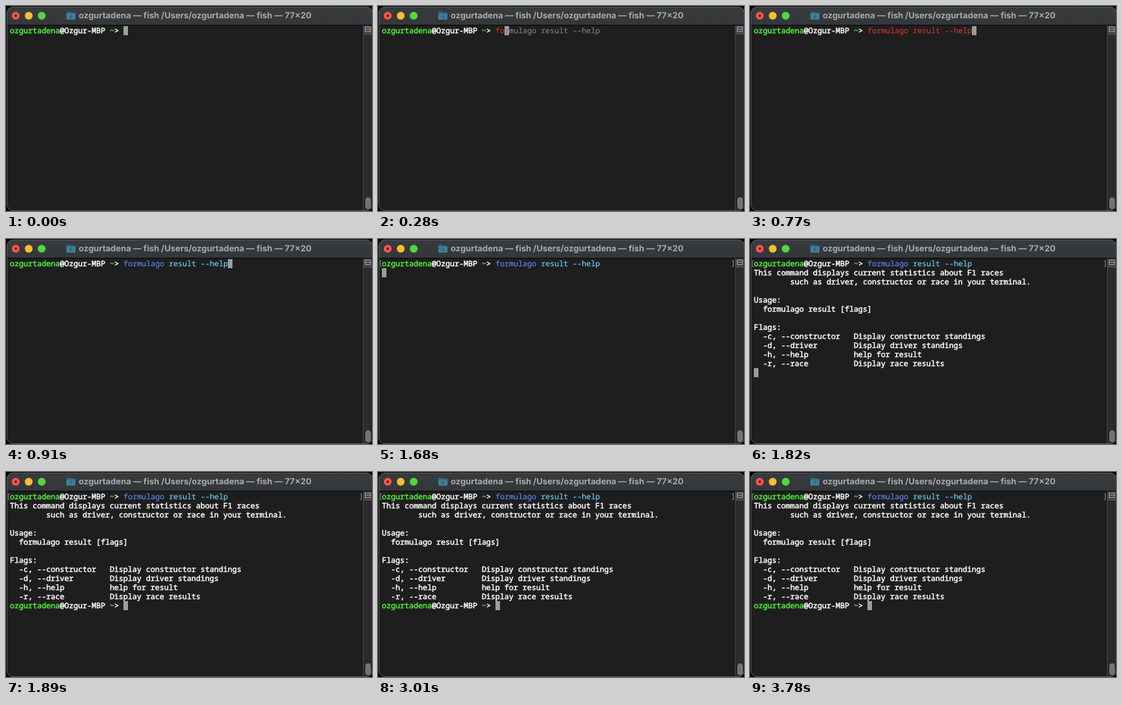
These frames come from a looping animation (564x316 px, 4200 ms). An HTML page:

```html
<!DOCTYPE html>
<html lang="en">
<head>
<meta charset="utf-8">
<title>Terminal</title>
<style>
  html, body { margin: 0; width: 100%; height: 100%; overflow: hidden; background: #000; }
  svg { display: block; width: 564px; height: 316px; }
  text { white-space: pre; text-rendering: geometricPrecision; }
  #title { font: 700 13px Inter, sans-serif; fill: #a8abad; }
  #screen { font: 500 11.667px "Noto Sans Mono", monospace; }
  #screen text { stroke-width: .2px; }
  #screen .strong { stroke-width: .5px; }
</style>
</head>
<body>
<svg viewBox="0 0 564 316">
  <defs>
    <linearGradient id="bar" x2="0" y2="1">
      <stop offset="0" stop-color="#393c3f"/>
      <stop offset="1" stop-color="#34373a"/>
    </linearGradient>
    <clipPath id="win"><rect x="1" y="1" width="564" height="315" rx="10"/></clipPath>
  </defs>
  <g clip-path="url(#win)">
    <rect width="564" height="316" fill="#1e1e1e"/>
    <rect width="564" height="29" fill="url(#bar)"/>
    <rect y="29" width="564" height="1" fill="#050505"/>
    <rect x="550" y="30" width="14" height="286" fill="#2b2b2f"/>
    <rect x="550" y="30" width="1" height="286" fill="#454548"/>
    <rect x="551" y="30" width="13" height="13" fill="#434346"/>
    <path d="M551 43.5h13" stroke="#555558"/>
    <path d="M553.5 32.5h8v7h-8zM554 36h7" fill="none" stroke="#a6a6a9"/>
    <rect x="554.5" y="295.5" width="7" height="17" rx="3.5" fill="#727275" stroke="#8a8a8d"/>
  </g>
  <rect x="1.5" y="1.5" width="563" height="314" rx="9.5" fill="none" stroke="#5d5f61"/>
  <circle cx="15" cy="15" r="6" fill="#f6564f"/>
  <circle cx="15" cy="15" r="2" fill="#760f0b"/>
  <circle cx="35" cy="15" r="6" fill="#f6be32"/>
  <circle cx="55" cy="15" r="6" fill="#4fd842"/>
  <g id="head">
    <rect y="8.5" width="7" height="6" rx="1.3" fill="#2d657f"/>
    <rect y="10" width="14" height="6" rx="1.3" fill="#2d657f"/>
    <rect y="11.5" width="14" height="9.500" rx="1.3" fill="#3f7f99"/>
    <path d="M7 13l3 3h-1v3h-4v-3h-1z" fill="#316d87"/>
    <text id="title" x="19" y="19.4"></text>
  </g>
  <g id="screen"></g>
</svg>
<script>
const NS = "http://www.w3.org/2000/svg";
const LOOP = 4200, CELL = 7, ROW = 14, LEFT = 6, TOP = 31;
const USER = "ozgurtadena", HOST = "Ozgur-MBP";
const C = {
  user: "#50f03a", cwd: "#34cc30", white: "#fff", grey: "#7d7d7d",
  red: "#cf3429", blue: "#5c86f5", cyan: "#68cdf5", cursor: "#9c9c9c"
};
const STRONG = [C.user, C.cwd, C.white];
const NAME = "formulago", ARGS = " result --help", CMD = NAME + ARGS;
const HELP = `This command displays current statistics about F1 races
        such as driver, constructor or race in your terminal.

Usage:
  formulago result [flags]

Flags:
  -c, --constructor   Display constructor standings
  -d, --driver        Display driver standings
  -h, --help          help for result
  -r, --race          Display race results`.split("\n");

const screen = document.getElementById("screen");
const head = document.getElementById("head");
const title = document.getElementById("title");

function add(tag, attrs, text = "") {
  const el = document.createElementNS(NS, tag);
  for (const k in attrs) el.setAttribute(k, attrs[k]);
  el.textContent = text;
  screen.append(el);
}

function write(col, row, text, color) {
  const pad = text.length - text.trimStart().length;
  add("text", {
    x: LEFT + (col + pad) * CELL, y: TOP + row * ROW + 11,
    fill: color, stroke: color, class: STRONG.includes(color) ? "strong" : ""
  }, text.trimStart());
}

function line(row, runs) {
  let col = 0;
  for (const [text, color] of runs) {
    write(col, row, text, color);
    col += text.length;
  }
}

const cursor = (col, row) => add("rect", {
  x: LEFT + col * CELL, y: TOP + row * ROW, width: CELL, height: ROW, fill: C.cursor
});

const PROMPT = [[USER, C.user], ["@" + HOST + " ", C.white], ["~", C.cwd], ["> ", C.white]];
const START = PROMPT.reduce((n, [text]) => n + text.length, 0);
const DONE = [[NAME, C.blue], [ARGS, C.cyan]];

function edit(typed, runs) {
  cursor(START + typed, 0);
  line(0, [...PROMPT, ...runs]);
}

const typing = n => edit(n, [[CMD.slice(0, n), C.red], [CMD.slice(n), C.grey]]);

function entered() {
  line(0, [...PROMPT, ...DONE]);
  for (const d of ["M5.5 33.5h-2v9h2", "M545.5 33.5h2v9h-2"])
    add("path", { d, fill: "none", stroke: "#8c8c8c" });
}

function output() {
  entered();
  HELP.forEach((text, i) => write(0, i + 1, text, C.white));
}

const steps = [
  [0, () => edit(0, [])],
  [210, () => typing(1)],
  [280, () => typing(2)],
  [770, () => edit(CMD.length, [[CMD, C.red]])],
  [840, () => edit(CMD.length, DONE)],
  [1680, () => { entered(); cursor(0, 1); }],
  [1750, () => { entered(); cursor(0, 1); }, CMD],
  [1820, () => { output(); cursor(0, 12); }],
  [1890, () => { output(); line(12, PROMPT); cursor(START, 12); }]
];

function show([, draw, job]) {
  const tail = job ? "77×…" : "77×20";
  title.textContent = `${USER} — ${job || "fish"} /Users/${USER} — fish — ${tail}`;
  // a title too long for the bar is set slightly tighter
  title.style.letterSpacing = job ? "-.1px" : "0";
  head.setAttribute("transform", `translate(${job ? 69 : 93})`);
  screen.replaceChildren();
  draw();
}

let current;
function tick() {
  const t = performance.now() % LOOP;
  const step = steps.findLast(([at]) => at <= t);
  if (step !== current) show(current = step);
  requestAnimationFrame(tick);
}
tick();
</script>
</body>
</html>
```
